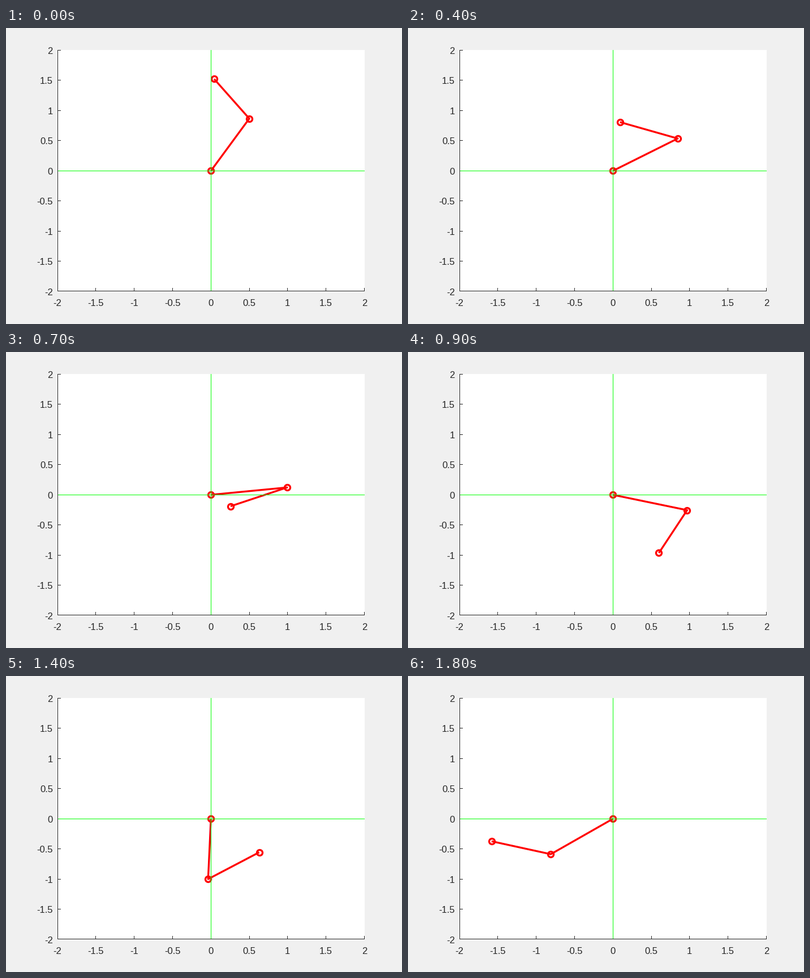
A matplotlib script that plays this animation: 700x525 px, repeating every 1.9 s.

```python
import numpy as np
import matplotlib.pyplot as plt
from matplotlib.animation import FuncAnimation
from matplotlib.patches import Rectangle

W, H, DPI = 700, 525, 100
PX = 72 / DPI                      # points per pixel
LEFT, RIGHT, TOP, BOTTOM = 91, 634, 39, 467
ORIGIN = np.array([362.25, 253.3])
UNIT = np.array([135.625, -106.97])  # pixels per data unit
DARK, GREEN = "#262626", "#00ff00"
L1, L2 = 1.0, 0.8
STEPS, INTERVAL = 19, 100

# Key poses: step, upper link angle, lower link angle (degrees).
POSES = np.array([
    (0, 60, 124.9),
    (2, 47, 139.5),
    (5, 24.4, 172.8),
    (7, 7, 202.9),
    (11, -42.7, 296.3),
    (12, -59.8, 330.3),
    (14, -92.1, 393.7),
    (18, -144.1, 524.5),
])

fig = plt.figure(figsize=(W / DPI, H / DPI), dpi=DPI, facecolor="#f0f0f0")
ax = fig.add_axes([0, 0, 1, 1])
ax.set_xlim(0, W)
ax.set_ylim(H, 0)
ax.axis("off")


def glide(t, keys, values):
    """Smooth cubic path through the key values."""
    slope = np.gradient(values, keys, edge_order=2)
    i = np.clip(np.searchsorted(keys, t, "right") - 1, 0, len(keys) - 2)
    h = keys[i + 1] - keys[i]
    u = (t - keys[i]) / h
    rise = u * u * (3 - 2 * u)
    return (values[i] + rise * (values[i + 1] - values[i])
            + h * u * (1 - u) * ((1 - u) * slope[i] - u * slope[i + 1]))


def stroke(x0, y0, x1, y1, color, z):
    ax.plot([x0, x1], [y0, y1], color=color, lw=PX, zorder=z,
            solid_capstyle="butt", snap=False)


def label(x, y, text, align):
    ax.text(x, y, text, ha=align, va="baseline", color=DARK,
            family="Liberation Sans", size=16.67 * PX)


def draw_axes():
    ax.add_patch(Rectangle((LEFT, TOP), RIGHT - LEFT, BOTTOM - TOP,
                           fc="white", lw=0, zorder=0))
    stroke(LEFT, BOTTOM - 0.5, RIGHT, BOTTOM - 0.5, DARK, 1)
    stroke(LEFT + 0.5, TOP, LEFT + 0.5, BOTTOM, DARK, 1)
    for v in np.arange(-2, 2.5, 0.5):
        x, y = ORIGIN + v * UNIT
        col = min(np.floor(x), RIGHT - 1) + 0.5
        row = min(np.floor(y), BOTTOM - 1) + 0.5
        stroke(col, BOTTOM - 6, col, BOTTOM, DARK, 1)
        stroke(LEFT, row, LEFT + 6, row, DARK, 1)
        label(x, 493, f"{v:g}", "center")
        label(83, y + 6.3, f"{v:g}", "right")
    stroke(LEFT + 1, 253.5, RIGHT, 253.5, GREEN, 3)
    stroke(362.5, TOP, 362.5, BOTTOM - 1, GREEN, 3)


def link(length, degrees):
    a = np.radians(degrees)
    return length * np.array([np.cos(a), np.sin(a)])


draw_axes()
arm, = ax.plot([], [], "o-", color="red", lw=3.33 * PX, ms=10 * PX,
               mfc="none", mew=3.33 * PX, zorder=2, snap=False,
               solid_capstyle="butt", solid_joinstyle="round")


def update(i):
    keys, upper, lower = POSES.T
    elbow = link(L1, glide(i, keys, upper))
    tip = elbow + link(L2, glide(i, keys, lower))
    points = ORIGIN + UNIT * np.array([(0, 0), elbow, tip])
    arm.set_data(points[:, 0], points[:, 1])
    return arm,


anim = FuncAnimation(fig, update, frames=STEPS, interval=INTERVAL,
                     repeat=True, repeat_delay=0)
plt.show()
```
